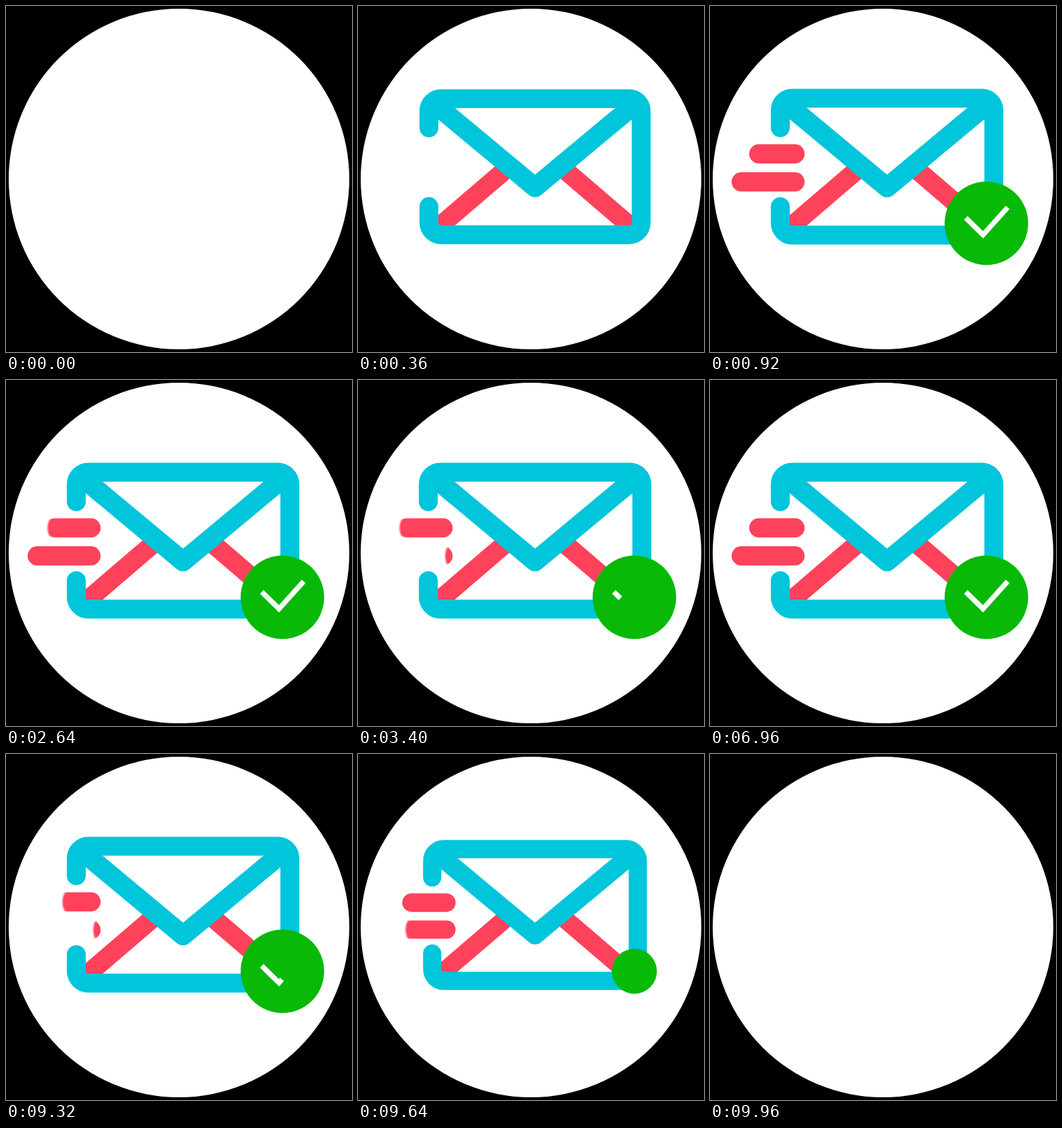
An HTML page with a canvas for the animation above (10000 ms loop, 512 px wide and 512 px high).

```html
<!DOCTYPE html>
<html lang="en">
<head>
<meta charset="utf-8">
<title>Mail sent</title>
<style>
  html, body { margin: 0; width: 100%; height: 100%; overflow: hidden; background: #000; }
  canvas { display: block; width: 512px; height: 512px; }
</style>
</head>
<body>
<canvas id="stage" width="512" height="512"></canvas>
<script>
const ctx = document.getElementById('stage').getContext('2d');
const LOOP = 10000, STEP = 40;
const CYAN = '#00c5db', PINK = '#ff425b', GREEN = '#08b908';
const TICK = [[378.5, 313.5], [404, 338.5], [440.5, 298]];
const TICK_LEN = 90.3;
const BAR_TRAVEL = 108, BAR_SPEED = 0.275;

const clamp = v => Math.max(0, Math.min(1, v));
const span = (t, a, b) => clamp((t - a) / (b - a));
const easeOut = x => 1 - (1 - x) ** 3;

function line(points, color, width, join = 'round', cap = 'butt') {
  ctx.beginPath();
  points.forEach(([x, y]) => ctx.lineTo(x, y));
  ctx.strokeStyle = color;
  ctx.lineWidth = width;
  ctx.lineJoin = join;
  ctx.lineCap = cap;
  ctx.stroke();
}

function disc(x, y, r, color) {
  ctx.beginPath();
  ctx.arc(x, y, r, 0, Math.PI * 2);
  ctx.fillStyle = color;
  ctx.fill();
}

function scaled(x, y, k, draw) {
  if (k <= 0) return;
  ctx.save();
  ctx.translate(x, y);
  ctx.scale(k, k);
  ctx.translate(-x, -y);
  draw();
  ctx.restore();
}

// A pill whose soft left end is wiped to the right by `shift`.
function bar(left, top, shift) {
  const right = 140, h = 28.5, mid = top + h / 2;
  if (left + shift >= right) return;
  ctx.save();
  ctx.fillStyle = PINK;
  ctx.beginPath();
  ctx.roundRect(left, top, right - left, h, h / 2);
  if (shift <= 0) {
    ctx.fill();
  } else {
    ctx.clip();
    ctx.filter = 'blur(1.2px)';
    const x = left + shift;
    ctx.beginPath();
    ctx.ellipse(x + 7, mid, 7, h / 2 + 1, 0, Math.PI / 2, Math.PI * 1.5);
    ctx.lineTo(right + 20, top - 1);
    ctx.lineTo(right + 20, top + h + 1);
    ctx.fill();
  }
  ctx.restore();
}

function envelope() {
  line([[230, 232], [118, 328]], PINK, 28);
  line([[294, 232], [406, 328]], PINK, 28);
  line([[116, 147], [262, 268.5], [408, 147]], CYAN, 29);
  const l = 104, r = 420, t = 136.5, b = 339, rad = 18;
  ctx.beginPath();
  ctx.moveTo(l, 180);
  ctx.arcTo(l, t, r, t, rad);
  ctx.arcTo(r, t, r, b, rad);
  ctx.arcTo(r, b, l, b, rad);
  ctx.arcTo(l, b, l, t, rad);
  ctx.lineTo(l, 297);
  ctx.lineCap = 'round';
  ctx.lineWidth = 28;
  ctx.stroke();
}

function tick(shown) {
  if (shown <= 0) return;
  ctx.save();
  if (shown < 1) ctx.setLineDash([TICK_LEN * shown, 200]);
  line(TICK, '#fff', 7.5, 'miter');
  ctx.restore();
}

function pose(t) {
  if (t < 1000) {
    return {
      mail: easeOut(span(t, 0, 440)),
      badge: easeOut(span(t, 360, 720)),
      top: BAR_TRAVEL * (1 - span(t, 300, 690)),
      low: BAR_TRAVEL * (1 - span(t, 420, 810)),
      tick: span(t, 660, 920)
    };
  }
  // The wipe repeats at 2.6, 5.6 and 8.6 seconds.
  const start = t >= 8600 ? 8600 : t >= 5600 ? 5600 : 2600;
  const u = t - start;
  const wipe = center => Math.max(0, BAR_TRAVEL - Math.abs(u - center) * BAR_SPEED);
  return {
    mail: 1 - span(t, 9600, 9960) ** 1.5,
    badge: 1 - span(t, 9520, 9780),
    top: wipe(420),
    low: wipe(760),
    tick: 1 - clamp((386 - Math.abs(u - 973)) * 0.36 / TICK_LEN)
  };
}

function render(t) {
  const p = pose(t);
  ctx.fillStyle = '#000';
  ctx.fillRect(0, 0, 512, 512);
  disc(256, 256, 252, '#fff');
  scaled(260, 250, p.mail, () => {
    envelope();
    bar(58, 204.5, p.top);
    bar(32, 246, p.low);
  });
  scaled(409, 321.5, p.badge, () => {
    disc(409, 321.5, 61.8, GREEN);
    tick(p.tick);
  });
}

function frame() {
  const t = performance.now() % LOOP;
  render(Math.floor(t / STEP) * STEP);
  requestAnimationFrame(frame);
}
frame();
</script>
</body>
</html>
```
